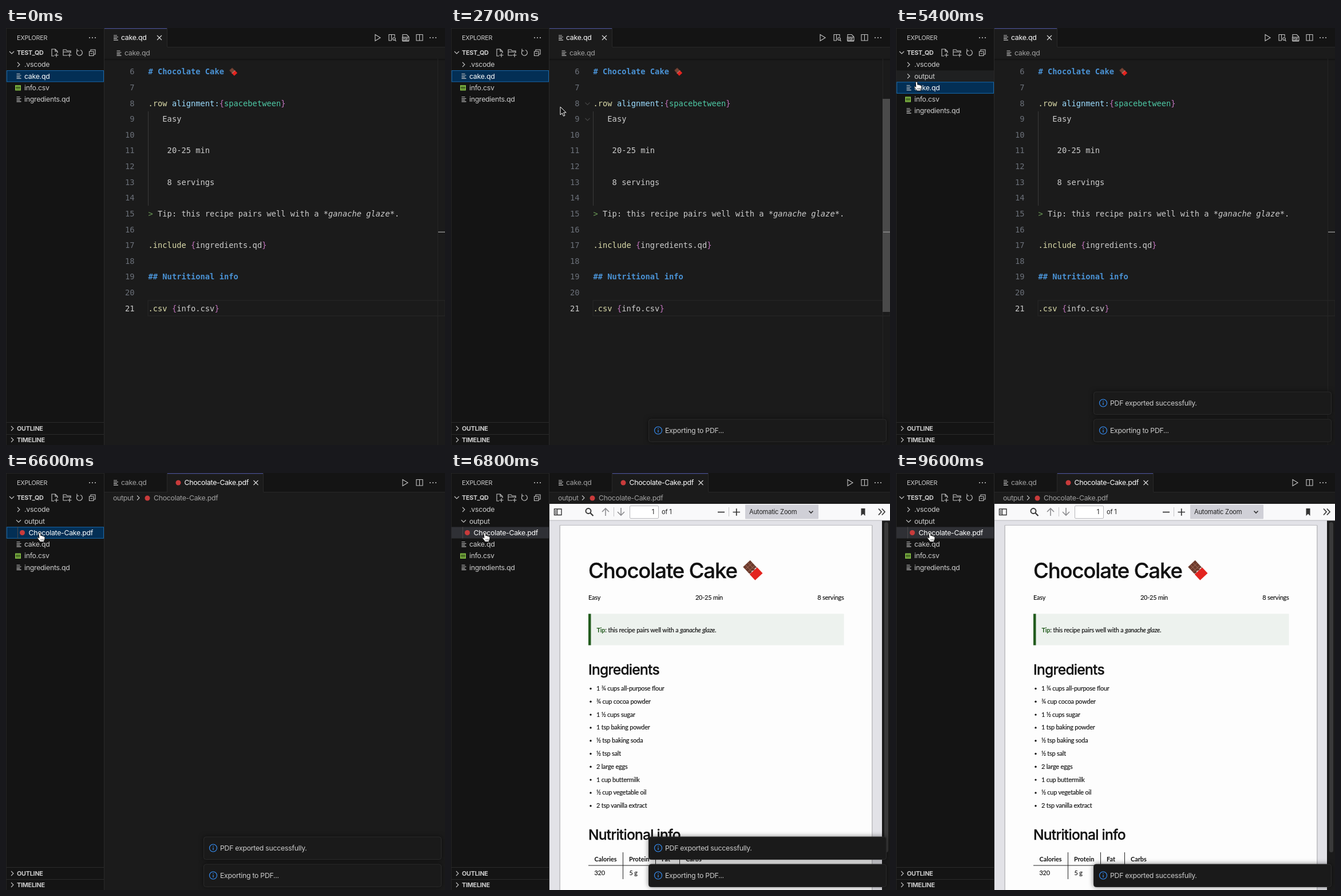
An HTML page for the animation above (9700 ms loop, 767x730 px).

```html
<!DOCTYPE html>
<html lang="en">
<head>
<meta charset="utf-8">
<title>Recipe export</title>
<style>
html, body { margin: 0; width: 100%; height: 100%; overflow: hidden; background: #1b1b1b; }
svg { display: block; width: 767px; height: 730px; }
text { font: 12.3px Inter, sans-serif; letter-spacing: -.022em; fill: #ccc; white-space: pre; }
.cap { font-size: 10.8px; }
.bold { font-weight: 700; }
.code text { font: 13.75px "DejaVu Sans Mono", monospace; letter-spacing: 0; }
.code .bold { font-weight: 700; }
.code .it { font-style: italic; }
.pdf text { font: 10.9px Lato, sans-serif; letter-spacing: -.018em; fill: #111; stroke: #111; stroke-width: .15px; }
.pdf .h { font: 500 24.6px Inter, sans-serif; letter-spacing: -.031em; stroke-width: .3px; }
.pdf .title { font-size: 36.5px; }
.bar text { font-size: 11.2px; fill: #222; }
.icon { fill: none; stroke: #c5c5c5; stroke-width: 1.1; }
.toast { filter: drop-shadow(0 0 4px rgba(0, 0, 0, .5)); }
</style>
</head>
<body>
<svg id="stage" viewBox="0 0 767 730"></svg>
<script>
const LOOP = 9700, ROW = 20.25;
const TIME = { press: 1005, folder: 4200, done: 4605, expand: 5800, open: 6500, viewer: 6650, page: 6750, dismiss: 8700 };

const text = (x, y, s, attrs = '') => `<text x="${x}" y="${y}" ${attrs}>${s}</text>`;
const rect = (x, y, w, h, fill, attrs = '') => `<rect x="${x}" y="${y}" width="${w}" height="${h}" fill="${fill}" ${attrs}/>`;
const icon = (d, attrs = '') => `<path class="icon" d="${d}" ${attrs}/>`;
const layer = (id, body, attrs = '') => `<g id="${id}" ${attrs}>${body}</g>`;

const lines = (x, y) => icon(`M${x} ${y - 4}h6m-6 2.7h8m-8 2.7h6m-6 2.7h8`);
const right = (x, y) => icon(`M${x - 2} ${y - 4}l4 4l-4 4`);
const down = (x, y) => icon(`M${x - 4} ${y - 2}l4 4l4 -4`);
const cross = (x, y) => icon(`M${x - 4} ${y - 4}l8 8m0 -8l-8 8`, 'style="stroke:#ddd"');
const dots = (x, y) => [-5, 0, 5].map(d => `<circle cx="${x + d}" cy="${y}" r="1" fill="#ccc"/>`).join('');
const redDot = (x, y) => `<circle cx="${x}" cy="${y}" r="4.5" fill="#c93b3b"/>`;
const play = x => icon(`M${x - 4} 11.5v11l9 -5.5z`);
const split = x => icon(`M${x - 5.5} 11.5h11v10.5h-11zM${x} 11.5v10.5`);

const chocolate = (x, y, k) => `<g transform="translate(${x} ${y}) rotate(-43) scale(${k})">` +
  rect(-8.5, -15.5, 17, 18, '#6b3a2c') +
  '<path d="M-8.5 -9.5h17M-8.5 -3.5h17M-2.8 -15.5v16M2.8 -15.5v16" stroke="#9a6250"/>' +
  '<path d="M-9 0l3.6 2l3.6 -2l3.6 2l3.6 -2l3.6 2v2h-18z" fill="#ddd"/>' +
  rect(-9, 2, 18, 14, '#e3241f') + '</g>';

function sidebar() {
  return rect(0, 0, 171, 730, '#141414') + rect(171, 0, 1, 730, '#292929') +
    text(19, 21, 'EXPLORER', 'class="cap"') + dots(151, 17) +
    down(10, 43) + text(19, 47, 'TEST_QD', 'class="cap bold"') +
    icon('M84 49h-4v-12h6l4 4v3M86 37v4h4M88 44v7m-3.5 -3.5h7') +
    icon('M107 48h-7v-10h5l1.5 2h6.5v4M100 42h13M111 44v7m-3.5 -3.5h7') +
    icon('M125 39.5a5 5 0 1 0 5 -1M124 36.5v3.5h3.5') +
    icon('M145.5 41h7.5v7.5h-7.5zM148 41v-3h8v8h-3M147.5 44.7h3.5') +
    layer('tree', '') +
    rect(0, 690, 171, 1, '#2b2b2b') + right(11, 701) + text(19, 705, 'OUTLINE', 'class="cap bold"') +
    rect(0, 711, 171, 1, '#2b2b2b') + right(11, 721) + text(19, 725, 'TIMELINE', 'class="cap bold"');
}

// [line number, column, text, colour, class]
const code = [
  [6, 0, '# Chocolate Cake', '#4a92d4', 'bold'],
  [8, 0, '.row', '#dcdcaa'], [8, 5, 'alignment:', '#9cdcfe'], [8, 15, '{', '#c072bb'],
  [8, 16, 'spacebetween', '#4ec9a5'], [8, 28, '}', '#c072bb'],
  [9, 3, 'Easy'], [11, 4, '20-25 min'], [13, 4, '8 servings'],
  [15, 0, '&gt;', '#6a9955'], [15, 2, 'Tip: this recipe pairs well with a'],
  [15, 37, '*ganache glaze*', '#ccc', 'it'], [15, 52, '.'],
  [17, 0, '.include', '#dcdcaa'], [17, 9, '{', '#c072bb'], [17, 10, 'ingredients.qd'], [17, 24, '}', '#c072bb'],
  [19, 0, '## Nutritional info', '#4a92d4', 'bold'],
  [21, 0, '.csv', '#dcdcaa'], [21, 5, '{', '#c072bb'], [21, 6, 'info.csv'], [21, 14, '}', '#c072bb']
];
const lineY = n => 81.3 + (n - 6) * 27.63;

function editor() {
  let out = '';
  for (let n = 6; n <= 21; n++)
    out += text(224.5, lineY(n), n, `text-anchor="end" style="fill:${n === 21 ? '#ccc' : '#6b7079'}"`);
  for (const [n, col, s, fill = '#ccc', cls = ''] of code)
    out += text(248.5 + col * 8.278, lineY(n), s, `class="${cls}" style="fill:${fill}"`);
  return rect(172, 54, 595, 1, '#121212') + rect(172, 55, 595, 2, '#171717') +
    rect(248, 477, 519, 27, 'none', 'stroke="#282828"') + rect(248, 146, 1, 165, '#3a3a3a') +
    `<g class="code">${out}</g>` + chocolate(397, 76.5, .41) +
    rect(754, 54, 1, 676, '#252525') +
    layer('folds', icon('M234.5 130.5l4 4l4 -4M234.5 158l4 4l4 -4', 'style="stroke:#444"')) +
    layer('scroll', rect(754, 124, 13, 373, '#4a4a4a')) + rect(755, 356.5, 12, 1.5, '#8b8b8b');
}

const tabBar = rect(172, 0, 595, 33, '#141414') + rect(172, 33, 595, 1, '#292929');
const activeTab = (x, w) => rect(x, 0, w, 34, '#1b1b1b') + rect(x, 0, w, 1.5, '#41477f') + rect(x + w - 1, 0, 1, 33, '#292929');
const dim = 'style="fill:#a0a0a0"', white = 'style="fill:#fff"';

function codeView() {
  return tabBar + activeTab(172, 110) + lines(188, 17) + text(201, 21, 'cake.qd', white) + cross(268, 17) +
    lines(193.5, 44) + text(207, 48, 'cake.qd', dim) +
    layer('hover', rect(688, 7, 20, 20, '#323334', 'rx="4"')) +
    play(649) + icon('M673.5 22h-4.5v-10.5h10v4M673.5 11.5v10.5') +
    '<circle class="icon" cx="678" cy="19" r="2.3"/>' + icon('M679.5 21l2 2') +
    icon('M693 16v-4.5h7l3.5 3.5v1M693 22v1h10.5v-1M692.5 16h11.5v6h-11.5z') +
    text(693.5, 21.2, 'PDF', 'style="font-size:4.8px;font-weight:700"') +
    split(722.5) + dots(746, 17) + editor();
}

function pdfView() {
  return tabBar + lines(188, 17) + text(201, 21, 'cake.qd', dim) + rect(281, 0, 1, 33, '#292929') +
    activeTab(282, 168) + redDot(301, 17) + text(311.5, 21, 'Chocolate-Cake.pdf', white) + cross(436.5, 17) +
    play(697) + split(722.5) + dots(746, 17) +
    text(187, 48, 'output', dim) + right(231, 43.5) + redDot(247, 44) + text(258, 48, 'Chocolate-Cake.pdf', dim) +
    layer('viewer', viewer());
}

function viewer() {
  const ink = (d, w = 1.7, c = '#333') => `<path d="${d}" fill="none" stroke="${c}" stroke-width="${w}"/>`;
  return rect(172, 83, 582, 647, '#e2e2e7') + layer('page', page()) +
    rect(753, 83, 14, 647, '#1b1b1b') + rect(757, 86, 7, 578, '#3a3a3a', 'rx="3.5"') +
    `<g class="bar">${rect(172, 54, 595, 29, '#f9f9fa')}${rect(172, 82.5, 595, 1, '#b8b8bb')}` +
    ink('M180.5 63h12.5v10.5h-12.5zM185.5 63v10.5M182 66h2m-2 2.5h2m-2 2.5h2', 1.4) +
    '<circle cx="240" cy="66.5" r="4.5" fill="none" stroke="#333" stroke-width="1.9"/>' + ink('M243.5 70l5 5', 2.2) +
    ink('M270 75v-13m-6 6l6 -6l6 6', 1.6, '#8d8d90') + ink('M297 61v13m-6 -6l6 6l6 -6', 1.6, '#8d8d90') +
    rect(284, 60, 1, 16, '#c5c5c8') +
    rect(312.5, 57.5, 50, 22, '#fff', 'stroke="#b8b8bc" rx="1.5"') + text(355, 72, '1', 'text-anchor="end"') + text(368, 72, 'of 1') +
    ink('M466 68.5h12') + rect(485, 60, 1, 16, '#c5c5c8') + ink('M492.5 68.5h12.5m-6.25 -6.25v12.5') +
    rect(514, 55.5, 128, 25, '#d0d0d7', 'rx="1"') + text(521, 72, 'Automatic Zoom') + ink('M625.5 66.5l3.5 3.5l3.5 -3.5') +
    '<path d="M716.5 62h7v13l-3.5 -3.5l-3.5 3.5z" fill="#333"/>' +
    ink('M747 62.5l5 5.5l-5 5.5M753 62.5l5 5.5l-5 5.5') + '</g>';
}

function page() {
  const items = ['1 ¾ cups all-purpose flour', '¾ cup cocoa powder', '1 ½ cups sugar', '1 tsp baking powder',
    '½ tsp baking soda', '½ tsp salt', '2 large eggs', '1 cup buttermilk', '½ cup vegetable oil', '2 tsp vanilla extract'];
  const list = items.map((s, i) => {
    const y = 381 + i * 22.8;
    return `<circle cx="244" cy="${y - 3.5}" r="1.7" fill="#111"/>` + text(254, y, s);
  }).join('');
  const heads = [[250.5, 'Calories'], [311, 'Protein'], [368, 'Fat'], [410, 'Carbs']];
  return `<g class="pdf">${rect(189.5, 91, 547, 645, '#bcbcc0', 'rx="1"')}${rect(191, 92, 544, 640, '#fdfdfd')}` +
    text(240, 183.5, 'Chocolate Cake', 'class="h title"') + chocolate(527, 170, 1) +
    text(240, 222, 'Easy') + text(427, 222, '20-25 min') + text(686.5, 222, '8 servings', 'text-anchor="end"') +
    rect(240, 246.5, 446.5, 55, '#edf2ee') + rect(240, 246.5, 4.5, 55, '#235c1e') +
    text(254.5, 278.5, '<tspan font-weight="700" fill="#235c1e" stroke="none">Tip</tspan>: this recipe pairs well with a <tspan font-style="italic">ganache glaze</tspan>.') +
    text(240, 352.5, 'Ingredients', 'class="h"') + list +
    text(240, 641.5, 'Nutritional info', 'class="h"') +
    heads.map(([x, s]) => text(x, 680, s, 'style="font-weight:700;letter-spacing:0;stroke:none"')).join('') +
    rect(240, 686.5, 209, 1, '#222') + [300, 357, 399].map(x => rect(x, 664, 1, 47, '#222')).join('') +
    text(250.5, 704, '320') + text(311.5, 704, '5 g') + '</g>';
}

const toast = (id, s) => layer(id, rect(345.5, .5, 415, 39.5, '#1a1a1a', 'rx="4" stroke="#2a2a2a"') +
  '<circle cx="362" cy="20" r="6.5" fill="none" stroke="#3794ff" stroke-width="1.1"/>' +
  '<path d="M362 19v4.5M362 16v1.5" stroke="#3794ff" stroke-width="1.2"/>' + text(374, 24.3, s), 'class="toast"');

const pointer = layer('arrow', '<path d="M0 0V14L3.3 11L5.6 16.2L8 15.1L5.7 10H10.2Z" fill="#111" stroke="#fff" stroke-linejoin="round"/>') +
  layer('hand', '<path d="M-1.8 1.5C-1.8 -.5 1.2 -.5 1.4 1.3L1.9 5.5C2.5 4.7 4.4 4.8 4.6 6C5.4 5.3 7 5.7 7.1 6.8C8 6.4 9 7 9 8.2C9.2 11 8.2 12.5 7.6 14L7.4 16H.6C-.5 13.5 -3 11.5 -4.2 9.5C-4.4 8 -2.5 7.8 -1.2 9.4Z" fill="#fff" stroke="#111"/>' +
    '<path d="M2 11v3M4.2 11v3M6.2 11v3" stroke="#333" stroke-width=".8"/>');

const el = id => document.getElementById(id);
el('stage').innerHTML = rect(0, 0, 767, 730, '#1b1b1b') + layer('code', codeView()) + layer('pdf', pdfView()) +
  sidebar() + rect(0, 0, 172, 1, '#242424') + rect(0, 0, 1, 730, '#242424') +
  toast('exporting', 'Exporting to PDF...') + toast('exported', 'PDF exported successfully.') + layer('cursor', pointer);

const show = (id, on) => { el(id).style.display = on ? '' : 'none'; };
const clamp = v => Math.max(0, Math.min(1, v));

// [time, x, y] of the pointer tip
const path = [[200, 640, -20], [850, 697, 20], [2040, 697, 20], [2700, 191, 138], [3350, 82, 139], [4650, 82, 139],
  [5400, 36, 94], [5680, 38, 83], [5880, 38, 83], [6350, 59, 104.5]];

function cursorAt(t) {
  const i = path.findIndex(p => p[0] > t);
  if (i === 0) return path[0].slice(1);
  if (i < 0) return path[path.length - 1].slice(1);
  const [a, b] = [path[i - 1], path[i]];
  const u = (t - a[0]) / (b[0] - a[0]), e = u * u * (3 - 2 * u);
  return [a[1] + (b[1] - a[1]) * e, a[2] + (b[2] - a[2]) * e];
}

function treeRows(t) {
  const rows = ['.vscode', 'cake.qd', 'info.csv', 'ingredients.qd'];
  if (t >= TIME.folder) rows.splice(1, 0, 'output');
  if (t >= TIME.expand) rows.splice(2, 0, 'Chocolate-Cake.pdf');
  return rows;
}

function drawTree(t, rows, over) {
  const picked = t >= TIME.open ? 'Chocolate-Cake.pdf' : t >= TIME.expand ? 'output' : 'cake.qd';
  return rows.map((name, i) => {
    const y = 64 + i * ROW, nested = name.endsWith('.pdf');
    let out = '';
    if (name === picked) out = t >= TIME.page ? rect(1, y - 10, 170, 20, '#2f3035')
      : rect(1.5, y - 9.7, 169, 19.5, '#032f55', 'stroke="#1769ad"');
    else if (i === over) out = rect(1, y - 10, 170, 20, '#1f2021');
    if (name === '.vscode') out += right(22, y);
    else if (name === 'output') out += t >= TIME.expand ? down(22, y) : right(22, y);
    else if (name === 'info.csv') out += rect(16, y - 4.5, 10, 9.5, '#7cb342') +
      `<path d="M19.3 ${y - 3}v6.5M22.7 ${y - 3}v6.5M17 ${y}h8" stroke="#24380f"/>`;
    else if (nested) out += rect(20, y - 10, 1, 20, '#4a4a4a') + redDot(28.5, y);
    else out += lines(18.5, y);
    return out + text(nested ? 39.5 : 32, y + 4.3, name, name === picked ? white : '');
  }).join('');
}

function placeToast(id, t, start, y) {
  const left = (1 - clamp((t - start) / 180)) ** 3;
  el(id).setAttribute('transform', `translate(0 ${y + 40 * left})`);
  el(id).style.opacity = 1 - left;
}

let lastTree = '';
function render(t) {
  const [x, y] = cursorAt(t), rows = treeRows(t);
  const row = x < 171 ? Math.floor((y - 53.9) / ROW) : -1;
  const over = row >= 0 && row < rows.length ? row : -1;
  const onButton = x > 687 && x < 709 && y > 6 && y < 28;

  const tree = drawTree(t, rows, over);
  if (tree !== lastTree) el('tree').innerHTML = lastTree = tree;

  show('code', t < TIME.open);
  show('pdf', t >= TIME.open);
  show('viewer', t >= TIME.viewer);
  show('page', t >= TIME.page);
  show('hover', onButton);
  const inside = clamp((t - 2270) / 100);
  el('scroll').style.opacity = inside * clamp((3000 - t) / 200);
  el('folds').style.opacity = inside * clamp((3400 - t) / 400);

  show('exporting', t >= TIME.press && t < TIME.dismiss);
  show('exported', t >= TIME.done);
  placeToast('exporting', t, TIME.press, 684.5);
  placeToast('exported', t, TIME.done, t < TIME.dismiss ? 636.5 : 684.5);

  el('cursor').setAttribute('transform', `translate(${x} ${y})`);
  show('hand', onButton || over >= 0);
  show('arrow', !onButton && over < 0);
}

const start = performance.now();
function tick() {
  render((performance.now() - start) % LOOP);
  requestAnimationFrame(tick);
}
tick();
</script>
</body>
</html>
```
